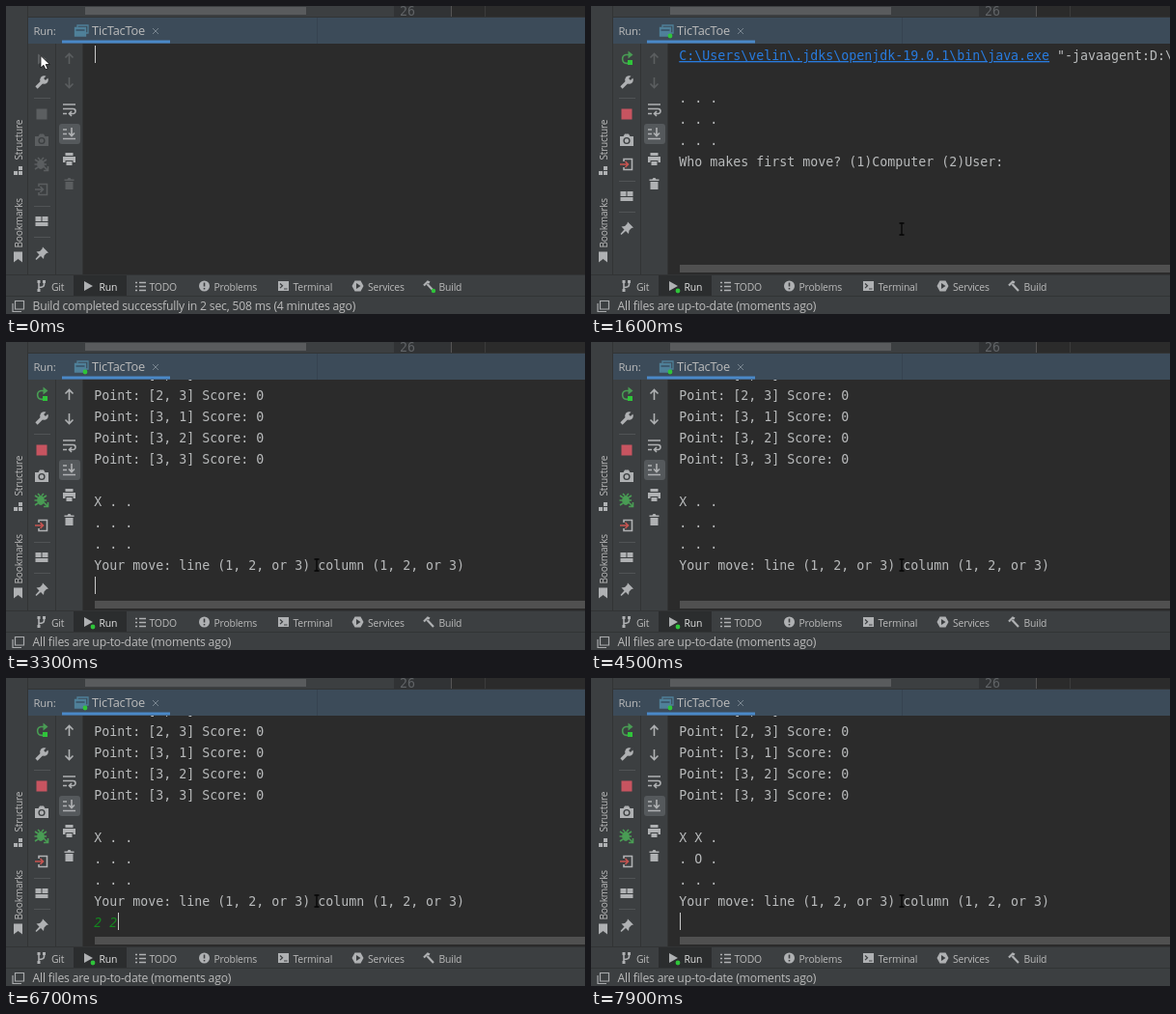
Write an HTML page that moves like this. It is 600 px wide and 319 px high and loops after 8000 ms.

```html
<!DOCTYPE html>
<html lang="en">
<head>
<meta charset="utf-8">
<title>TicTacToe run</title>
<style>
html, body { margin: 0; width: 100%; height: 100%; overflow: hidden; background: #3c3f41; }
#stage { display: block; width: 600px; height: 319px; }
text { font-family: "Open Sans", "Noto Sans", sans-serif; letter-spacing: -.2px; fill: #bbb; white-space: pre; }
.tabs text { font-size: 10.4px; }
.side text { font-size: 10.1px; }
.mono text { font: 13.29px "DejaVu Sans Mono", "Noto Sans Mono", monospace; letter-spacing: 0; fill: #b8babb; }
.mono .link { fill: #287bde; text-decoration: underline; }
.mono .typed { fill: #14861f; font-style: italic; }

.ico { color: #afb1b3; }
.ico path { fill: none; stroke: currentColor; stroke-width: 1.6; }
.ico .f { fill: currentColor; stroke: none; }
.live, .nav { color: #5b5e60; }
.dot, .again { display: none; }
.on .dot, .on .again { display: inline; }
.on .play, .on .built { display: none; }
.on .live { color: #afb1b3; }
.on .stop { color: #c75460; }
.on .bug { color: #499c54; }
.on .door { color: #c75450; }
.long .nav { color: #afb1b3; }
.short .bug { display: none; }
.short .tail { transform: translateY(-26px); }
</style>
</head>
<body>
<svg id="stage" viewBox="0 0 600 319">
  <rect width="600" height="319" fill="#3c3f41"/>

  <!-- editor edge -->
  <rect x="402" width="59" height="11" fill="#313335"/>
  <rect x="461" width="139" height="11" fill="#2b2b2b"/>
  <rect x="82" y="1" width="229" height="8" fill="#595b5d"/>
  <path d="M461.500 0V11" stroke="#555"/>
  <path d="M496.500 0V11" stroke="#3b3b3b"/>
  <g class="mono"><text x="408" y="10" style="fill:#606366">26</text></g>

  <!-- tool window header -->
  <rect x="23" y="12" width="577" height="27" fill="#3c4b59"/>
  <path d="M23 11.500H600" stroke="#323435"/>
  <path d="M322.500 12V39" stroke="#364350"/>
  <rect x="58" y="35.500" width="112" height="3" fill="#4a88c7"/>
  <text x="28.500" y="30" font-size="11.3">Run:</text>
  <text x="89" y="30" font-size="12.8">TicTacToe</text>
  <path d="M152 23l6 6m0-6l-6 6" stroke="#78858f"/>
  <g fill="none" stroke="#4f8099" stroke-width="1.300">
    <path d="M74 22V20H85V28H83"/>
    <path d="M71.500 22.500H82.500V31H71.500Z" fill="#4f8099"/>
    <path d="M72.500 25H81.500" stroke="#33475a"/>
  </g>
  <circle class="dot" cx="82" cy="31" r="2.400" fill="#2fc43a"/>

  <!-- console -->
  <rect x="80" y="39" width="520" height="239" fill="#2b2b2b"/>
  <svg class="mono" x="80" y="39" width="520" height="238" viewBox="80 39 520 238">
    <g id="log"></g>
    <rect id="caret" width="1" height="18" fill="#c8c8c8"/>
    <rect id="bar" x="92" y="268" width="508" height="8" fill="#a6a6a6" fill-opacity=".3"/>
  </svg>
  <path d="M22.500 0V278M51.500 39V278M79.500 39V278M0 278.500H600M0 300.500H600" stroke="#323435"/>

  <!-- run toolbar -->
  <g class="ico">
    <path class="live play f" d="M33 49.500l9 5.500-9 5.500z"/>
    <g class="again" style="color:#499c54">
      <path d="M40 50.500H36A4.500 4.500 0 1 0 41.500 56" stroke-width="2"/>
      <path class="f" d="M38.500 46.500l5 4-5 4z"/>
      <rect x="38" y="56" width="5" height="5" fill="#2fc43a"/>
    </g>
    <path d="M31.500 84.500l7-7" style="stroke-width:3.200"/>
    <circle cx="39.500" cy="76.500" r="4.300" fill="currentColor"/>
    <path d="M40 76l5-5" style="stroke:#3c3f41;stroke-width:2.600"/>
    <path d="M29 95.500H46" style="stroke:#515456;stroke-width:1"/>
    <rect class="live stop" x="31.500" y="106.500" width="11" height="11" fill="currentColor"/>
    <g class="live">
      <path class="f" d="M30 135H33.500L35 132.500H39L40.500 135H44V145H30Z"/>
      <circle cx="37" cy="139.500" r="2.900" fill="none" stroke="#3c3f41" stroke-width="1.400"/>
    </g>
    <g class="live bug">
      <ellipse cx="36" cy="164" rx="3.800" ry="5" fill="currentColor"/>
      <path d="M30 159l3 2m9-2l-3 2M29.500 164H42M30 169l3-2M33 157l2 2m4-2l-2 2" stroke-width="1.300"/>
      <path d="M38 165l5 5M43.500 166v4.500H39" stroke-width="1.500"/>
    </g>
    <g class="tail">
      <path class="live" d="M34 187V184.500H42.500V195.500H34V193"/>
      <path class="live door" d="M30 190H38M35.500 187l3 3-3 3"/>
      <path d="M29 207.500H46M29 239.500H46" style="stroke:#515456;stroke-width:1"/>
      <path class="f" d="M30.500 218h6v5h-6zM37.500 218h6v5h-6zM30.500 224h13v4h-13z"/>
      <path class="f" d="M38 249.500l6 6-2 .5-2.500 2.500-.5 3.500-3-3-4.500 4-1-1 4-4.500-3-3 3.500-.5 2.500-2.500z"/>
    </g>
  </g>

  <!-- console toolbar -->
  <g class="ico">
    <path class="nav" d="M65.500 60V49.500M61.500 53.500l4-4 4 4"/>
    <path class="nav" d="M65.500 74V84.500M61.500 80.500l4 4 4-4"/>
    <path d="M59 102H72M59 106.500H69.500A2.300 2.300 0 0 1 69.500 111.500H66M59 111.500H63M68 109l-2.500 2.500 2.500 2.500"/>
    <rect x="55" y="122" width="22" height="21" rx="3" fill="#55595c"/>
    <path d="M59 137.500H72M59 128H63M59 132.500H63M68 126V134M65 131.500l3 3 3-3"/>
    <path class="f" d="M61.500 152h8v3h-8zM59 156h13v6h-2.500v-2h-8v2H59zM62.500 161h6v4h-6z"/>
    <path class="live f" d="M60.500 179.500h3l1-1.500h2l1 1.500h3v1.500h-10zM61.500 182h8v8h-8z"/>
  </g>

  <!-- side strip -->
  <g class="side">
    <text transform="translate(17 159.500) rotate(-90)">Structure</text>
    <text transform="translate(17 250.500) rotate(-90)">Bookmarks</text>
    <g class="ico">
      <path class="f" d="M8 171h4v4H8zM13 171h4v4h-4zM13 166h4v4h-4z"/>
      <path class="f" d="M8 254.500h9V265.500l-4.500-3.500-4.500 3.500z"/>
    </g>
  </g>

  <!-- bottom tabs -->
  <rect x="70" y="279" width="55" height="21" fill="#2b2d2e"/>
  <g class="tabs">
    <text x="47" y="295">Git</text>
    <text x="96.500" y="295" style="fill:#e4e4e4">Run</text>
    <text x="148.500" y="295">TODO</text>
    <text x="215.500" y="295">Problems</text>
    <text x="297.500" y="295">Terminal</text>
    <text x="375" y="295">Services</text>
    <text x="448.500" y="295">Build</text>
    <g class="ico">
      <path d="M34 287V295M39.500 287v1.500q0 3-5.500 3" stroke-width="1.400"/>
      <path class="f" d="M32.500 284h3v3h-3zM38 284h3v3h-3zM32.500 293h3v3h-3z"/>
      <path class="f" d="M81 285l9 5-9 5z"/>
      <circle class="dot" cx="90" cy="295" r="2.400" fill="#2fc43a"/>
      <path d="M134 286.500h2M138 286.500h7M134 290.500h2M138 290.500h7M134 294.500h2M138 294.500h7"/>
      <circle cx="205.500" cy="290" r="5.500" fill="currentColor"/>
      <path d="M205.500 286.500v4M205.500 292v1.600" style="stroke:#3c3f41"/>
      <rect x="282" y="285" width="11" height="10" fill="currentColor"/>
      <path d="M284 287.500l2.500 2.300-2.500 2.300M288 293h3.500" style="stroke:#3c3f41;stroke-width:1.200"/>
      <path class="f" d="M361.500 284.500h6l3 5.500-3 5.500h-6l-3-5.500z"/>
      <path d="M363 287l4.500 3-4.500 3z" style="fill:#3c3f41;stroke:none"/>
      <path d="M433 289.500l4-4 2 1M436.500 288l6.500 7" style="stroke-width:2.200"/>
      <circle class="built" cx="443" cy="295" r="2.200" fill="#2fc43a"/>
    </g>
  </g>

  <!-- status bar -->
  <g fill="none" stroke="#a9abad" stroke-width="1.200">
    <path d="M9.500 305.500H18.500V314H9.500Z"/>
    <path d="M7 308V316.500H16"/>
  </g>
  <text id="status" x="27.500" y="315" font-size="12.2"></text>

  <g id="mouse">
    <path id="arrow" d="M0 0V12.500L3 9.800 5 14.300 7.200 13.300 5.200 9H9.300Z" fill="#fff" stroke="#111" stroke-width=".8"/>
    <path id="beam" d="M-2.500-6H-.5L0-5.500 .5-6H2.500M0-5.500V5.500M-2.500 6H-.5L0 5.500 .5 6H2.500" fill="none" stroke="#050505" stroke-width="1.300"/>
  </g>
</svg>
<script>
const LOOP = 8000, LEFT = 91.3, CHAR = 8, ROW = 22.05, TOP = 56, BOTTOM = 258.4;
const $ = id => document.getElementById(id);

const link = 'C:\\Users\\velin\\.jdks\\openjdk-19.0.1\\bin\\java.exe';
const command = link + ' "-javaagent:D:\\';
const blank = '. . .';
const ask = 'Your move: line (1, 2, or 3) column (1, 2, or 3)';

// Scores of every free cell, skipping the taken ones
const scores = taken => ['11', '12', '13', '21', '22', '23', '31', '32', '33']
  .filter(c => !taken.includes(c))
  .map(c => `Point: [${c[0]}, ${c[1]}] Score: 0`);

// Typed lines carry a leading ">"
const intro = [command, '', blank, blank, blank, 'Who makes first move? (1)Computer (2)User:'];
const first = [...intro, '>1', ...scores([]), '', 'X . .', blank, blank, ask];
const second = [...first, '>2 2', ...scores(['11', '22']), '', 'X X .', '. O .', blank, ask];

const built = 'Build completed successfully in 2 sec, 508 ms (4 minutes ago)';
const fresh = 'All files are up-to-date (moments ago)';

// at, lines, toolbar mode, pinned to the end, caret phase
const steps = [
  [0, [''], ''],
  [600, [''], 'on short'],
  [800, [command, ''], 'on short'],
  [1100, [...intro, ''], 'on short'],
  [2000, [...intro, '>1'], 'on short'],
  [2500, [...first, ''], 'on short'],
  [2700, [...first, ''], 'on long', true, 2900],
  [4700, [...first, '>2'], 'on long', true],
  [5200, [...first, '>2 '], 'on long', true],
  [6600, [...first, '>2 2'], 'on long', true],
  [7600, [...first, '>2 2', ''], 'on long', true],
  [7700, [...second, ''], 'on long', true]
].map(([at, lines, mode, end, phase = at]) => ({ at, lines, mode, end, phase }));

function lineMarkup(line, y) {
  const typed = line[0] === '>';
  const body = line === command
    ? `<tspan class="link">${link}</tspan>${line.slice(link.length)}`
    : line.slice(typed ? 1 : 0);
  return `<text x="${LEFT}" y="${y}"${typed ? ' class="typed"' : ''}>${body}</text>`;
}

function show({ at, lines, mode, end }) {
  const last = lines.length - 1;
  const base = end ? BOTTOM - last * ROW : TOP;
  $('log').innerHTML = lines.map((s, i) => lineMarkup(s, base + i * ROW)).join('');
  $('caret').setAttribute('x', Math.round(LEFT + .7 + CHAR * lines[last].replace('>', '').length));
  $('caret').setAttribute('y', Math.round(base + last * ROW - 15));
  $('stage').setAttribute('class', mode);
  $('bar').style.display = at < 800 ? 'none' : '';
  $('status').textContent = at < 800 ? built : fresh;
}

function moveMouse(t) {
  const p = Math.min(1, Math.max(0, (t - 200) / 600));
  const k = p * p * (3 - 2 * p);
  const x = 36 + 286 * k, y = 51.5 + 179.5 * k;
  $('mouse').setAttribute('transform', `translate(${x} ${y})`);
  $('arrow').style.display = x < 80 ? '' : 'none';
  $('beam').style.display = x < 80 ? 'none' : '';
}

let current;
function draw(now) {
  const t = now % LOOP;
  const step = steps.filter(s => s.at <= t).pop();
  if (step !== current) show(current = step);
  $('caret').style.display = (t - step.phase) % 1000 < 500 ? '' : 'none';
  moveMouse(t);
}

const start = performance.now();
function tick() {
  draw(performance.now() - start);
  requestAnimationFrame(tick);
}
tick();
</script>
</body>
</html>
```
